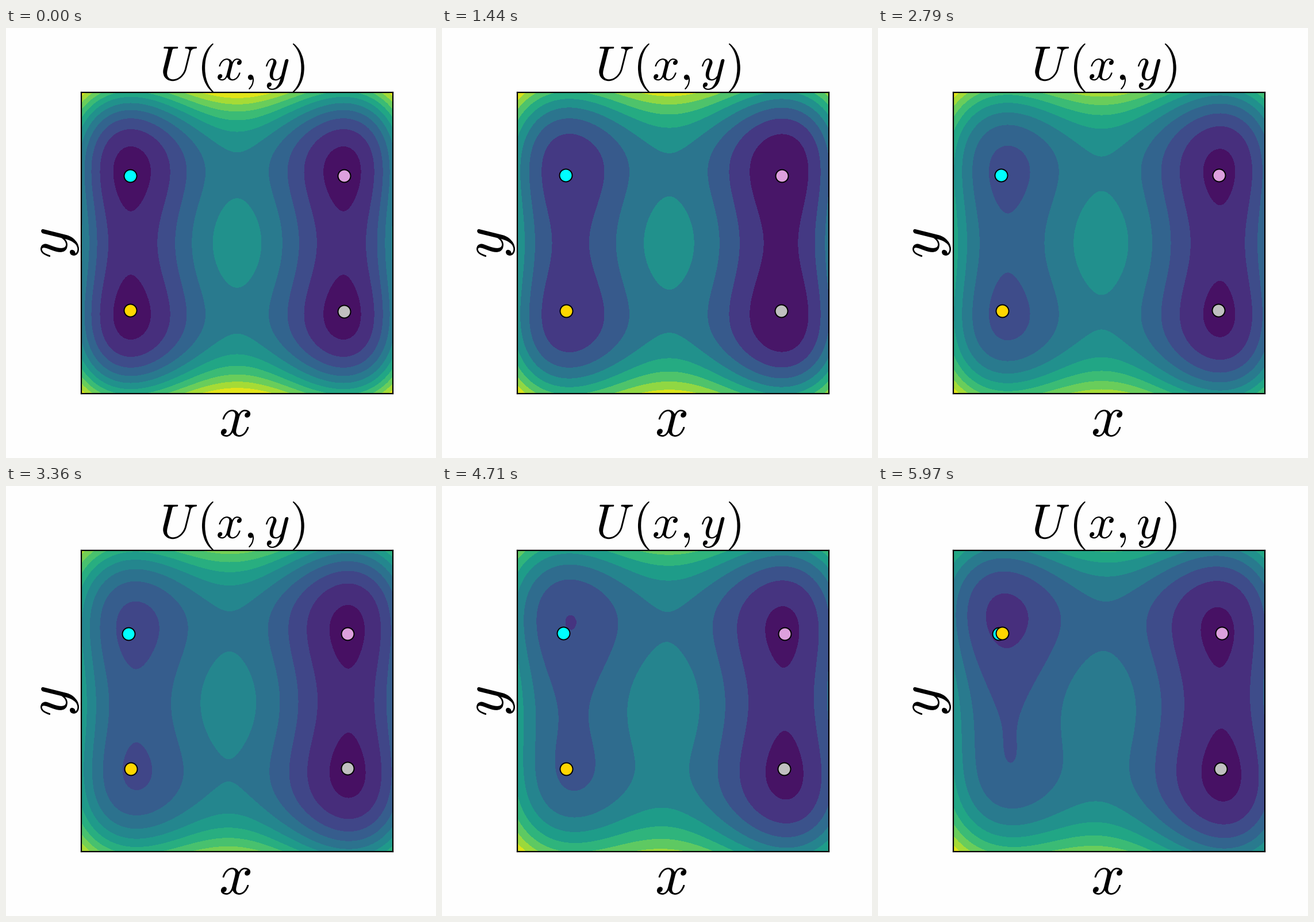
A matplotlib script that plays this animation: 748x748 px, repeating every 6 s.

```python
import numpy as np
import matplotlib.pyplot as plt
from matplotlib.animation import FuncAnimation
from matplotlib.patches import PathPatch
from matplotlib.textpath import TextPath
from matplotlib.transforms import Affine2D

plt.rcParams["mathtext.fontset"] = "cm"

SIZE, DPI = 748, 100
FRAMES, INTERVAL = 200, 30
LIM = 3.0
BETA_X, BETA_Y = 2.3, 1.435
TILT_X, TILT_Y, COUPLING = 0.2, 0.1, 0.062
HOP_START = 165

grid = np.linspace(-LIM, LIM, 121)
X, Y = np.meshgrid(grid, grid)
noise = np.random.default_rng(7).normal(0, 0.005, (FRAMES, 4, 2))

fig, ax = plt.subplots(figsize=(SIZE / DPI, SIZE / DPI), dpi=DPI,
                       facecolor="#fefefe")
fig.subplots_adjust(left=0.175, right=0.9, bottom=0.15, top=0.85)
ax.set(xlim=(-LIM, LIM), ylim=(-LIM, LIM), xticks=[], yticks=[])
for spine in ax.spines.values():
    spine.set_linewidth(1.6)


def label(text, size, cx, cy, angle=0):
    """Draw math text with its ink centred on pixel (cx, cy)."""
    path = TextPath((0, 0), text, size=size)
    path = path.transformed(Affine2D().rotate_deg(angle))
    box = path.get_extents()
    shift = Affine2D().translate(cx - (box.x0 + box.x1) / 2,
                                 SIZE - cy - (box.y0 + box.y1) / 2)
    fig.add_artist(PathPatch(path.transformed(shift), fc="black", lw=0,
                             transform=None))


label(r"$U\hspace{0.1}(x{,}\hspace{0.17}y\hspace{0.04})$", 84.5, 396, 69.3)
label(r"$x$", 103.5, 399.5, 687.5)
label(r"$y$", 103.5, 93.5, 374, 90)

dots = [ax.plot([], [], "o", ms=15.8, mfc=color, mec="black", mew=1.4,
                zorder=3 + i)[0]
        for i, color in enumerate(["cyan", "plum", "silver", "gold"])]
fill = None


def ramp(p, start, stop):
    return float(np.clip((p - start) / (stop - start), 0, 1))


def potential(p):
    """Tilt along x in the first half, couple x and y in the second."""
    first, second = ramp(p, 0, 0.5), ramp(p, 0.5, 1)
    dx = X - TILT_X * first
    dy = Y - TILT_Y * second
    return (dx**2 / 2 + BETA_X * np.cos(X) + dy**2 / 2 + BETA_Y * np.cos(Y)
            + COUPLING * second * dx * dy)


def particles(n, p):
    hop = ramp(n, HOP_START, FRAMES - 1)
    pos = np.array([[-2.055 - 0.07 * p, 1.342],
                    [2.062 + 0.105 * p, 1.348],
                    [2.055 + 0.105 * p, -1.353],
                    [-2.055, -1.345 - 0.02 * p + 2.72 * hop]])
    return pos + noise[n]


def update(n):
    global fill
    p = n / (FRAMES - 1)
    if fill is not None:
        fill.remove()
    fill = ax.contourf(X, Y, potential(p), levels=10, cmap="viridis", zorder=1)
    for dot, (x, y) in zip(dots, particles(n, p)):
        dot.set_data([x], [y])
    return [fill, *dots]


anim = FuncAnimation(fig, update, frames=FRAMES, interval=INTERVAL,
                     init_func=lambda: dots, repeat=True, repeat_delay=0,
                     blit=False)
plt.show()
```
